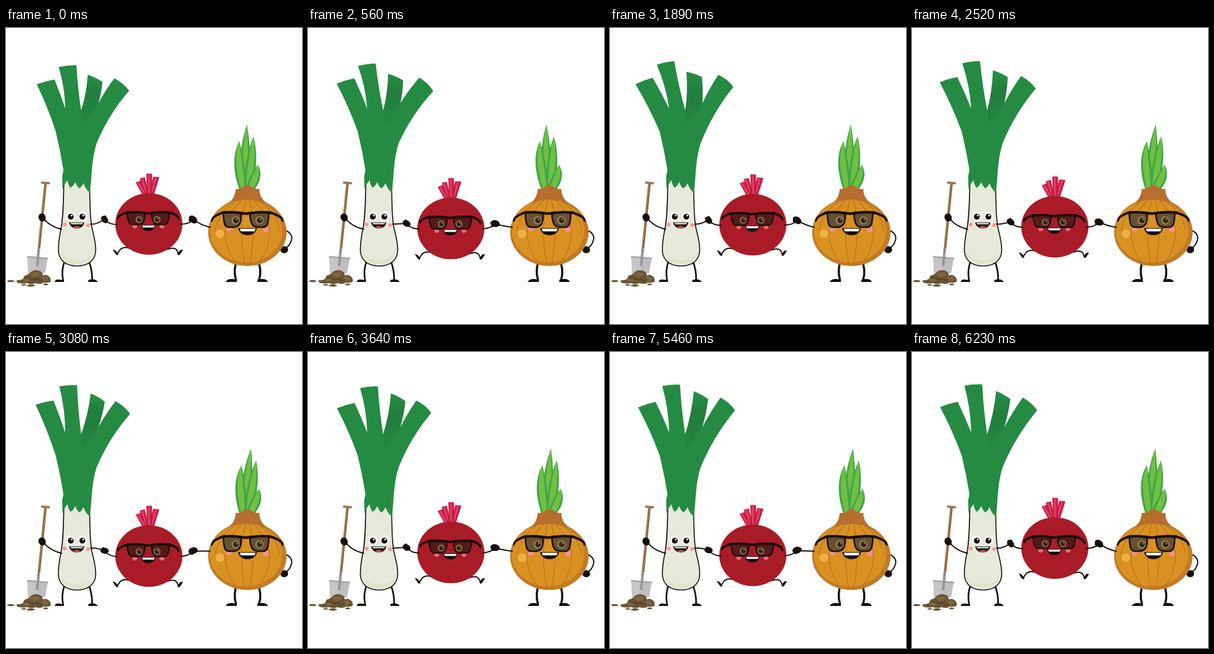
An HTML page that plays this animation: 500 by 500 pixels, repeating every 6300 ms.

```html
<!DOCTYPE html>
<html lang="en">
<head>
<meta charset="utf-8">
<title>Vegetable friends</title>
<style>
  html, body { margin: 0; width: 100%; height: 100%; overflow: hidden; background: #fff; }
  svg { display: block; width: 100vw; height: 100vh; }
  .ink { fill: #170d0a; }
  .limb { fill: none; stroke: #170d0a; stroke-width: 2; stroke-linecap: round; stroke-linejoin: round; }
  .leg { stroke-width: 2.8; }
  .thick { stroke-width: 3.6; }
</style>
</head>
<body>
<svg viewBox="0 0 500 500">
  <defs>
    <linearGradient id="shade" x1="0" y1="0" x2="0" y2="1">
      <stop offset=".1" stop-color="#000" stop-opacity="0"/>
      <stop offset=".35" stop-color="#000" stop-opacity=".09"/>
      <stop offset="1" stop-color="#000" stop-opacity=".05"/>
    </linearGradient>
  </defs>

  <!-- shovel and soil -->
  <g>
    <path d="M66.5 263L55.500 373" stroke="#a1774c" stroke-width="4.200"/>
    <path d="M68 264L57 373" stroke="#7d5a38" stroke-width="1.200"/>
    <path d="M61 261.300L72.500 262.300" stroke="#9c7857" stroke-width="4" stroke-linecap="round"/>
    <path d="M36 388L70 391L66 413L50 422L37 416Z" fill="#c6c6c8"/>
    <path d="M53 390L70 391L66 413L50 420Z" fill="#bebec1"/>
    <path d="M35.500 386.500L71 389.500" stroke="#a6a6a9" stroke-width="3"/>
    <path d="M55.500 372L52.500 402" stroke="#98989b" stroke-width="4.500"/>
    <circle cx="54.500" cy="376" r="1" fill="#55555a"/>
    <path d="M18 430Q24 425 29 424Q30 417 36 417Q40 415 42 412Q48 407 56 410Q62 412 62 418Q68 415 73 420Q77 424 75 429Q70 431 64 430Q58 434 50 431Q43 434 36 431Q27 433 18 430Z" fill="#6a5434"/>
    <path d="M40 416Q49 410 58 415Q54 422 46 421ZM60 421Q68 417 72 424Q67 429 62 428ZM28 426Q36 420 42 426Q36 431 28 426Z" fill="#7c6541"/>
    <path d="M39 423Q46 427 51 423Q57 429 63 425M33 421L39 423" fill="none" stroke="#4b3a22" stroke-width="1.300"/>
    <g fill="#6a5434">
      <ellipse cx="8" cy="427.500" rx="6" ry="1.800"/>
      <ellipse cx="22" cy="427.500" rx="4.500" ry="1.800"/>
      <ellipse cx="30" cy="434" rx="4" ry="1.200"/>
      <ellipse cx="42" cy="435" rx="7" ry="1.900"/>
      <ellipse cx="67" cy="433" rx="4" ry="1.500"/>
    </g>
  </g>

  <!-- leek -->
  <g>
    <path class="limb leg" d="M99 394Q93 409 96.500 427M140 394Q146 409 145.500 427"/>
    <path class="ink" d="M82 429Q84 424 90 425L98 426V429ZM139 429V426Q142 424 147 424.500Q153 425 155 429Z"/>
    <path d="M98 250C97 290 97 318 93 338C90 353 88 364 88.500 377C90 394 103 402 120 402C138 402 151 393 151.500 376C152 362 148 350 145 337C142 320 141 300 141.500 250Z" fill="#e7eada" stroke="#1a1210" stroke-width="1.700"/>
    <path d="M92 376Q95 398 120 399Q145 398 148 376Q143 392 120 392Q98 391 92 376Z" fill="#d9dfc5" opacity=".6"/>
    <path class="limb" d="M94 340Q73 335 63 321"/>
    <ellipse class="ink" cx="61" cy="320" rx="6" ry="7" transform="rotate(-25 61 320)"/>
    <path id="leek" fill="#258b43"/>
    <path id="leekShade" fill="url(#shade)"/>
    <g fill="#fff"><circle cx="109" cy="318" r="8"/><circle cx="129.500" cy="318" r="8"/></g>
    <g class="ink"><circle cx="109.500" cy="318.700" r="5"/><circle cx="129" cy="318.700" r="5"/></g>
    <g fill="#fff"><circle cx="111" cy="316.700" r="1.600"/><circle cx="130.500" cy="316.700" r="1.600"/></g>
    <g fill="#f59a95"><circle cx="99" cy="332" r="3.200"/><circle cx="138.500" cy="333" r="3.200"/></g>
    <path class="ink" d="M106.500 328.500H132.500Q130 338.500 119.500 338.500Q109 338.500 106.500 328.500Z"/>
    <path d="M109 329.500H130L129 331.500H110Z" fill="#fff"/>
    <path d="M113 336.500Q120 332.500 126 336.500Q120 339 113 336.500Z" fill="#e5574c"/>
  </g>

  <!-- onion -->
  <g>
    <g id="onionLeaves"></g>
    <path class="limb thick" d="M391.500 389Q383 407 388.500 426M424 389Q433 408 427.500 426"/>
    <path class="ink" d="M371 429Q374 423.500 382 424L390 425V429ZM424.500 429V425Q440 421.500 442.500 429Z"/>
    <path class="limb" d="M470 341Q484 346 482.500 357Q480 368 471 373"/>
    <ellipse class="ink" cx="470" cy="374.500" rx="6.500" ry="6"/>
    <ellipse cx="407.700" cy="345" rx="66.300" ry="57" fill="#c27b26"/>
    <ellipse cx="405.500" cy="343" rx="61" ry="53" fill="#d99121"/>
    <path d="M370 299Q387 291 388 272Q398 272 402 267Q407 263 413 267Q418 272 428 272Q428 290 446 299Q408 281 370 299Z" fill="#b76d2d"/>
    <g fill="none" stroke="#b87322" stroke-width="1.200">
      <path d="M399 290Q372 315 370 348Q372 376 388 395M405 290Q397 320 398 350Q399 382 404 400M411 290Q419 320 417 352Q416 382 411 400M417 290Q445 316 445 347Q443 376 427 396M386 294Q358 312 353 343M429 294Q459 312 462 343"/>
    </g>
    <circle cx="361.500" cy="347.500" r="7.300" fill="#eeb047"/>
    <g fill="#f3928d"><circle cx="376" cy="339" r="5"/><circle cx="439" cy="340" r="5"/></g>
    <path id="shades" d="M367 312Q382 310 397 312Q398 325 394 332Q391 336 385 336.500H376Q371 336 369 330Q367 322 367 312ZM412 312Q428 310 444 312Q444 322 442 330Q440 336 435 336.500H426Q419 336 416 332Q412 325 412 312Z" fill="#665131" stroke="#170d0a" stroke-width="2.600"/>
    <g fill="#958053"><circle cx="388" cy="325" r="7"/><circle cx="428" cy="325" r="7"/></g>
    <g fill="#30251a"><circle cx="388.500" cy="325" r="4.700"/><circle cx="428.500" cy="325" r="4.700"/></g>
    <g fill="#958053"><circle cx="390" cy="323" r="1.600"/><circle cx="430" cy="323" r="1.600"/></g>
    <path class="ink" d="M347 328Q345 326 348 320Q356 313 366 309.500Q384 308 398 310.500Q405 312 412 310.500Q430 308 446 309.500Q459 313 467 320Q470 325 468 328Q465 326 464 322Q455 316 445 314Q428 312 413 315Q405 316.500 397 315Q382 312 366 314Q357 317 351 322Q350 326 347 328Z"/>
    <path class="ink" d="M392 338H424Q421 350 408 350Q395 350 392 338Z"/>
    <path d="M395 339H421.500L420 343.500H396.500Z" fill="#fff"/>
  </g>

  <!-- arms reaching for the beet -->
  <path id="leekArm" class="limb"/>
  <path id="onionArm" class="limb"/>

  <!-- beet -->
  <g id="beet">
    <g fill="#d3234d">
      <path d="M219 261L226.500 258L238 281H230Z"/>
      <path d="M226 254L234 252L241 281H232Z"/>
      <path d="M237 246H246L246 281H238Z"/>
      <path d="M248.500 251L259 252L250 281H242Z"/>
    </g>
    <path d="M223 261L234 280M230 255L237 280M241.500 248L241.500 280M253 253L246 280" stroke="#ee5b7e" stroke-width="1.300"/>
    <path d="M226.500 259L237 280M234 253L240 280M246 247V280M258 253L249 280" stroke="#a51b39" stroke-width="1.300"/>
    <path class="limb" d="M211 373Q200 368 193 374L187.500 382M272 374Q285 369 289 376L291.500 382"/>
    <path class="ink" d="M190 383Q187 385 184.500 381L180.500 374.500Q184 374 187 378ZM289.500 382Q292 386 295 381L299 375Q295 373 292 378Z"/>
    <ellipse cx="241.300" cy="331" rx="56.700" ry="52" fill="#a91c27"/>
    <circle cx="211" cy="314" r="7" fill="#bd2c3a" opacity=".5"/>
    <g fill="#ee6d78"><circle cx="217.500" cy="334.500" r="4"/><circle cx="263.500" cy="334.500" r="4"/></g>
    <path d="M204.500 312Q220 310 235 312Q235 322 232 328Q229 332 224 332H214Q209 332 207 326Q204.500 320 204.500 312ZM246 312Q261 310 276 312Q276 320 274 326Q272 332 267 332H257Q252 332 249 328Q246 322 246 312Z" fill="#551a1a" stroke="#170d0a" stroke-width="2.300"/>
    <g fill="#856a43"><circle cx="225" cy="323.500" r="6"/><circle cx="255" cy="323.500" r="6"/></g>
    <g fill="#2b1714"><circle cx="225.500" cy="323.500" r="3.700"/><circle cx="255" cy="323.500" r="3.700"/></g>
    <g fill="#a38a60"><circle cx="226.700" cy="322" r="1.200"/><circle cx="256.200" cy="322" r="1.200"/></g>
    <path class="ink" d="M189 323Q186 321 189 317Q196 312 205 309.500Q222 308.500 234 310.500Q240 312 246 310.500Q260 308.500 277 309.500Q286 312 291 317Q294 321 292 325Q289 323 288 319.500Q284 316 276 314Q260 312 246 314.500Q240 316 234 314.500Q220 312 205 314Q196 316 192 319.500Q191 323 189 323Z"/>
    <path class="ink" d="M228 332.500H253Q251 343 240.500 343Q230 343 228 332.500Z"/>
    <path d="M230 333.500H251L250 337H231Z" fill="#fff"/>
  </g>
  <path id="beetArms" class="limb"/>
  <g id="handL" class="ink"><ellipse rx="7" ry="5.200"/><circle cx="-3" cy="-3.500" r="2.200"/></g>
  <g id="handR" class="ink"><ellipse rx="8" ry="5.600"/><circle cx="-3" cy="3.500" r="2.800"/></g>
</svg>

<script>
const LOOP = 6300, STEP = 70, BOUNCE = 2100;
const $ = id => document.getElementById(id);
const draw = (id, d) => $(id).setAttribute('d', d);
const place = (id, x, y, turn = 0) =>
  $(id).setAttribute('transform', `translate(${x} ${y}) rotate(${turn})`);

// Shared key times for the swaying greens
const times = [0, 1120, 1890, 3080, 3640, 4690, 5670];

// Left corner of each leek leaf: x and y keys, pivot, vector to the right corner
const leaves = [
  { x: [52, 45.5, 43, 50, 49, 47, 47.5], y: [95, 93.5, 95, 89, 95, 97, 93], pivot: [90, 145], edge: [30, -8] },
  { x: [89, 81, 79, 90, 88, 86, 88.5], y: [66, 63, 62, 58, 61, 62, 57], pivot: [113, 140], edge: [30, -3] },
  { x: [138, 132.5, 129, 143, 140, 138, 142], y: [79, 76, 74, 70, 70, 68, 66], pivot: [142, 140], edge: [25, 12] },
  { x: [183, 191, 183, 185, 183, 184, 187], y: [85, 82.5, 79, 83, 82, 78, 77], pivot: [165, 150], edge: [25, 21] }
];
const onionSway = [0, -7, 0, 7, 3.5, -1, 4];

// Smooth curve through the keys, flat at turning points, held after the last
function track(v, t) {
  const n = times.length - 1;
  if (t >= times[n]) return v[n];
  let i = 0;
  while (t >= times[i + 1]) i++;
  const slope = k => (v[k + 1] - v[k]) / (times[k + 1] - times[k]);
  const tangent = k => {
    if (k === 0) return slope(0);
    if (k === n) return 0;
    const a = slope(k - 1), b = slope(k);
    return a * b <= 0 ? 0 : 2 * a * b / (a + b);
  };
  const h = times[i + 1] - times[i], u = (t - times[i]) / h, w = 1 - u;
  return v[i] * (1 + 2 * u) * w * w + v[i + 1] * u * u * (3 - 2 * u)
    + h * u * w * (tangent(i) * w - tangent(i + 1) * u);
}

// Quadratic edge from p to q, bulging to the left of travel
function bend(p, q, bulge) {
  const dx = q[0] - p[0], dy = q[1] - p[1], k = bulge / Math.hypot(dx, dy);
  return `Q${(p[0] + q[0]) / 2 + dy * k} ${(p[1] + q[1]) / 2 - dx * k} ${q[0]} ${q[1]}`;
}

function corners({ x, y, pivot, edge }, t) {
  const a = [track(x, t), track(y, t)];
  const angle = (px, py) => Math.atan2(py - pivot[1], px - pivot[0]);
  const r = angle(...a) - angle(x[0], y[0]), c = Math.cos(r), s = Math.sin(r);
  return [a, [a[0] + edge[0] * c - edge[1] * s, a[1] + edge[0] * s + edge[1] * c]];
}

const joints = [[84, 175], [100, 136], [127, 139], [156, 127], [153, 195]];
const bulges = [[-3, 1.5, 1], [-5, 2, -2], [-4, 2, 2], [2, 4, -8.5]];

function drawLeek(t) {
  const sides = leaves.map((leaf, i) => {
    const [a, b] = corners(leaf, t), [rise, top, fall] = bulges[i];
    return bend(joints[i], a, rise) + bend(a, b, top) + bend(b, joints[i + 1], fall);
  });
  draw('leek', `M95.500 273Q95 262 95 250L97 240Q92 208 84 175${sides.join('')}`
    + 'Q147 214 145 240Q144 260 141.500 278Q134 272 131 262Q129 267 124 271Q119 267 117 260Q114 267 109 270Q105 265 104 257Q98 264 95.500 273Z');
  draw('leekShade', `M127 139${sides[2]}L141 150L129 163Z`);
}

// Onion leaves, back to front: base x, tip x, tip y, left and right belly x, belly y, sway
const blades = [
  [406, 407, 163, 389, 416, 214, 1],
  [402, 394, 191, 376, 404, 226, .55],
  [408, 418, 183, 402, 429, 222, .65],
  [409, 425.5, 231, 408, 438, 254, .3]
];

function drawOnionLeaves(sway) {
  const shape = ([base, tx, ty, left, right, y, k], from, to, half, color) => {
    const dx = sway * k, tip = `${tx + dx} ${ty}`;
    const belly = f => `${left + (right - left) * f + dx * .45} ${y}`;
    return `<path fill="${color}" d="M${base - half} 278Q${belly(from)} ${tip}`
      + `Q${belly(to)} ${base + half} 278Z"/>`;
  };
  $('onionLeaves').innerHTML = blades.map(b =>
    shape(b, 0, 1, 6, '#41a649') + shape(b, .2, .8, 3, '#70c044')).join('');
}

function drawBeet(t) {
  const k = (1 - Math.cos(t / BOUNCE * 2 * Math.PI)) / 2;
  const drop = 13.8 * k, y = 323.5 + 12.3 * k;
  place('beet', 0, drop);
  place('handL', 166.5, y, 50 - 45 * k);
  place('handR', 316, y, 40 - 55 * k);
  draw('leekArm', `M143 331.500Q153 ${332 - 2 * k} 166 ${y}`);
  draw('onionArm', `M345 336.500Q330 ${333.5 + 2.5 * k} 318 ${y + 1}`);
  draw('beetArms', `M188 ${332 + drop}Q176 ${332 + drop} 168 ${y + 2}`
    + `M294 ${331.5 + drop}Q307 ${331.5 + drop} 315 ${y + 2}`);
}

function frame() {
  const t = Math.floor(performance.now() % LOOP / STEP) * STEP;
  drawLeek(t);
  drawOnionLeaves(track(onionSway, t));
  drawBeet(t);
  requestAnimationFrame(frame);
}
frame();
</script>
</body>
</html>
```
